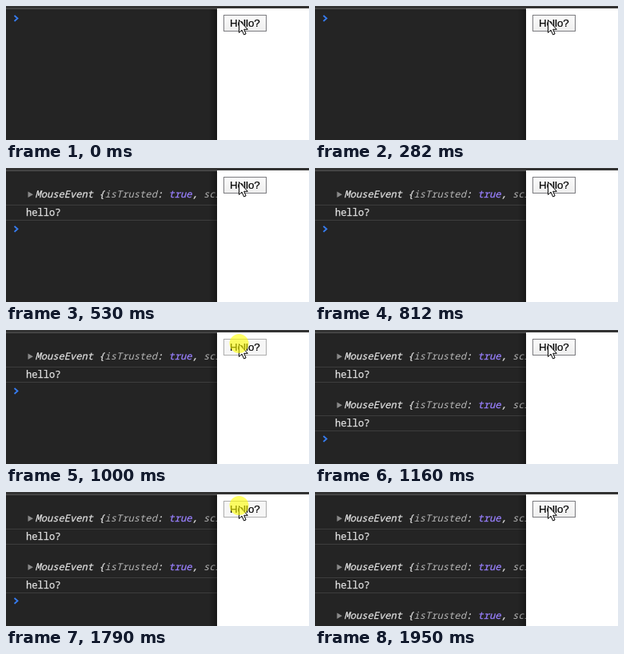
An HTML page that plays this animation: 379 px wide and 168 px high, repeating every 2260 ms.

```html
<!DOCTYPE html>
<html lang="en">
<head>
<meta charset="utf-8">
<title>Click logger</title>
<style>
  html, body { margin: 0; width: 100%; height: 100%; overflow: hidden; background: #242424; }
  svg { display: block; width: 379px; height: 168px; }
  text { white-space: pre; }

  .mono { font: 500 12.1px "Noto Sans Mono", "DejaVu Sans Mono", monospace; fill: #e0e0e0; stroke: #e0e0e0; stroke-width: .25px; }
  .event { font-style: italic; }
  .key { fill: #b4b4b4; stroke: none; }
  .bool { fill: #9980ff; stroke: #9980ff; }
  .rule { fill: #3d3d3d; }
  .label { font: 13.33px "Liberation Sans", Arial, sans-serif; fill: #000; stroke: #000; stroke-width: .2px; }

  /* Clicks at 470, 1000 and 1790 ms; logs at 530, 1160 and 1950 ms */
  .log, .prompt, .press { animation: 2260ms step-end infinite; }
  .log1 { animation-name: log1; }
  .log2 { animation-name: log2; }
  .log3 { animation-name: log3; }
  .prompt { animation-name: prompt; }
  .press { animation-name: press; }

  @keyframes log1 { 0% { opacity: 0 } 23.451%, 100% { opacity: 1 } }
  @keyframes log2 { 0% { opacity: 0 } 51.327%, 100% { opacity: 1 } }
  @keyframes log3 { 0% { opacity: 0 } 86.283%, 100% { opacity: 1 } }
  @keyframes prompt {
    0% { transform: translateY(0) }
    23.451% { transform: translateY(61px) }
    51.327% { transform: translateY(121px) }
    86.283%, 100% { transform: translateY(182px) }
  }
  @keyframes press {
    0%, 23.451%, 51.327%, 86.283%, 100% { opacity: 0 }
    20.796%, 44.248%, 79.204% { opacity: 1 }
  }
</style>
</head>
<body>
<svg viewBox="0 0 379 168">
  <defs>
    <linearGradient id="face" x2="0" y2="1">
      <stop stop-color="#fbfbfb"/><stop offset="1" stop-color="#eee"/>
    </linearGradient>
    <linearGradient id="shade">
      <stop stop-color="#000" stop-opacity="0"/><stop offset="1" stop-color="#000" stop-opacity=".3"/>
    </linearGradient>
    <g id="entry">
      <path d="M27.5 29.5L34 33.3L27.5 37Z" fill="#8a8a8a"/>
      <text class="mono event" x="36.5" y="37">MouseEvent {<tspan class="key">isTrusted</tspan>: <tspan class="bool">true</tspan>, <tspan class="key">screenX</tspan></text>
      <rect class="rule" y="46" width="264" height="1"/>
      <text class="mono" x="25" y="60">hello?</text>
      <rect class="rule" y="65" width="264" height="1"/>
    </g>
  </defs>

  <rect width="379" height="168" fill="#242424"/>
  <use class="log log1" href="#entry"/>
  <use class="log log2" href="#entry" y="61"/>
  <use class="log log3" href="#entry" y="122"/>
  <path class="prompt" d="M10.5 12L14.5 15.5L10.5 19" fill="none" stroke="#367cf1" stroke-width="1.8"/>

  <rect x="254" y="3" width="10" height="165" fill="url(#shade)"/>
  <rect x="264" y="3" width="115" height="165" fill="#fff"/>
  <rect width="379" height="3" fill="#333"/>
  <rect y="3" width="264" height="1" fill="#525252"/>

  <rect x="272.5" y="11.5" width="53" height="20" fill="url(#face)" stroke="#7c7c80"/>
  <rect class="press" x="272.5" y="11.5" width="53" height="20" fill="#f6f6f6" stroke="#adadad"/>
  <text class="label" x="280" y="26">Hello?</text>
  <path d="M291.5 17.5V33.5L295.1 30.2L297.6 36L300.1 35L297.7 29.3H302.3Z" fill="#fff" stroke="#000"/>
  <circle class="press" cx="291.5" cy="17" r="12" fill="#ff0" fill-opacity=".6"/>
</svg>
</body>
</html>
```
